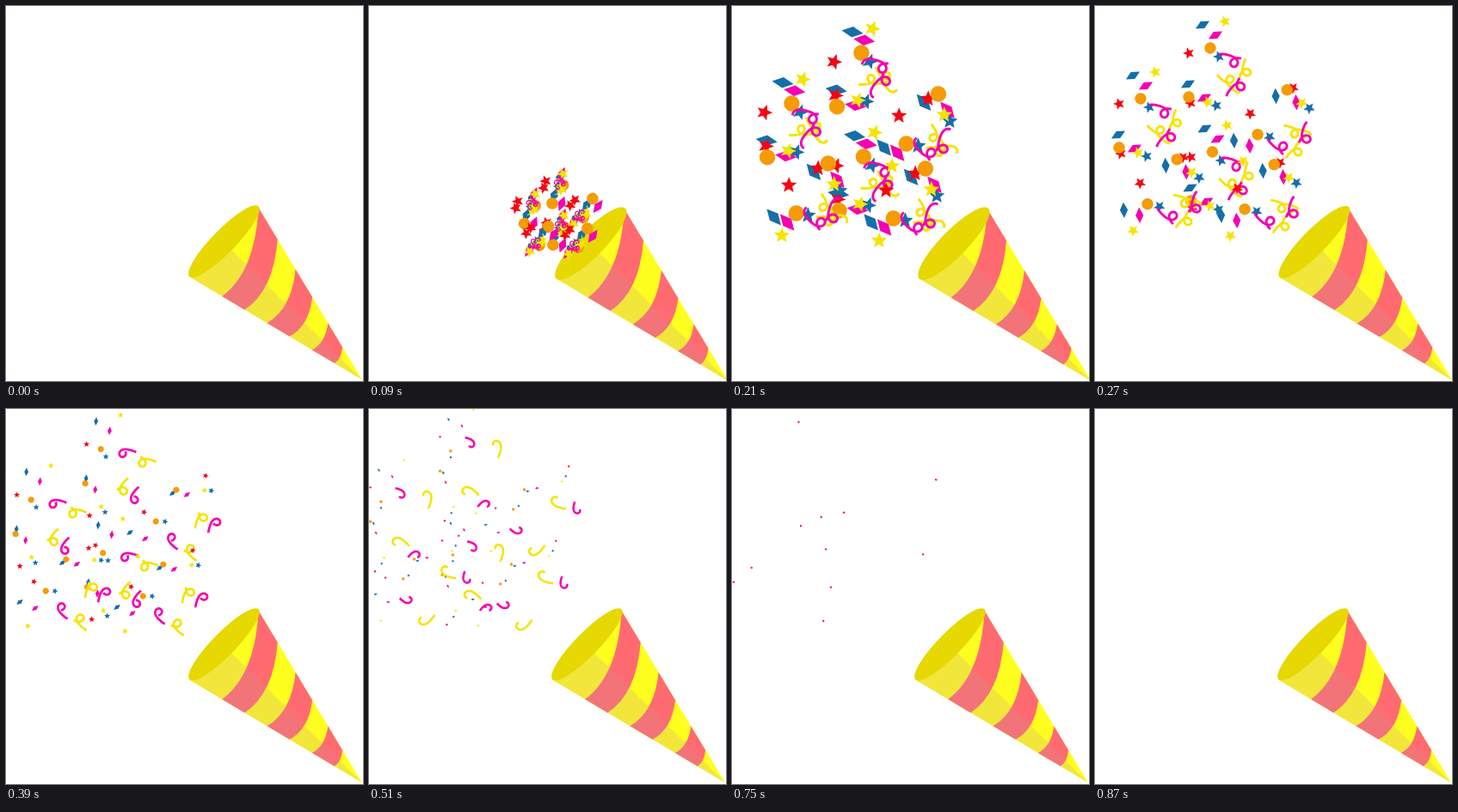
Write an HTML page with a canvas that moves like this. It is 415 px wide and 437 px high and loops after 1050 ms.

```html
<!DOCTYPE html>
<html lang="en">
<head>
<meta charset="utf-8">
<title>Party popper</title>
<style>
  html, body { margin: 0; width: 100%; height: 100%; overflow: hidden; background: #fff; }
  canvas { display: block; width: 100%; height: 100%; }
</style>
</head>
<body>
<canvas id="stage" width="415" height="437"></canvas>
<script>
const ctx = document.getElementById('stage').getContext('2d');
const LOOP = 1050, STEP = 30;
const BLUE = '#146fa8', PINK = '#f500b0', YELLOW = '#f5e400', RED = '#f50514', ORANGE = '#f59b05';

const rad = d => d * Math.PI / 180;
const clamp = (v, a, b) => Math.min(b, Math.max(a, v));
const mix = (a, b, f) => a + (b - a) * f;
const mix2 = (p, q, f) => [mix(p[0], q[0], f), mix(p[1], q[1], f)];

// One phase unit is 120 ms, counted from 150 ms. Everything slows by DRAG per unit.
const DRAG = .65;
const phase = t => (t - 150) / 120;
const slow = k => (1 - DRAG ** k) / (1 - DRAG ** 4);
const VIA = slow(1);

// Pieces fly from a start, past a bend, to an end
const pieces = [
  ['star', BLUE, [176, 75], [144, 59], [80, 58]],
  ['gem', BLUE, [160, 44], [125, 22], [85, 12]],
  ['gem', PINK, [171, 47], [140, 34], [100, 16]],
  ['star', RED, [129, 78], [109, 55], [75, 27]],
  ['star', YELLOW, [178, 38], [151, 18], [114, -3]],
  ['dot', ORANGE, [171, 66], [134, 49], [85, 52]],
  ['star', BLUE, [171, 103], [141, 116], [82, 121]],
  ['gem', BLUE, [141, 106], [108, 91], [83, 70]],
  ['gem', PINK, [165, 127], [127, 107], [80, 80]],
  ['star', RED, [132, 92], [111, 113], [82, 134]],
  ['star', YELLOW, [166, 106], [131, 112], [91, 114]],
  ['dot', ORANGE, [140, 129], [109, 106], [77, 62]]
];

// Curls are a window on an endless looping line: end and length in radians of curl
const pinkCurl = k => ({ end: -.5 - .45 * k + .6 * k * k, len: 9 - 1.7 * k, size: 8.5 - .9 * k, turn: 15 });
const yellowCurl = k => ({ end: .9, len: 11 - 2.2 * k, size: 7, turn: 17 + 90 * (k - 2) });
const ribbons = [
  [yellowCurl, YELLOW, 0, [184, 94], [139, 28]],
  [yellowCurl, YELLOW, -65, [175, 86], [97, 98]],
  [pinkCurl, PINK, 0, [180, 74], [98, 27]],
  [pinkCurl, PINK, -65, [180, 86], [119, 118]]
];

// The cluster is shown three times as it is and three times mirrored
const plain = [[0, 0], [-81, 59], [2.5, 121]];
const mirrored = [[75, 64], [-53, 145], [60, 151]];
const MIRROR = rad(57);
const MOUTH = [245, 290];

function poly(pts) {
  ctx.beginPath();
  pts.forEach(p => ctx.lineTo(...p));
  ctx.closePath();
  ctx.fill();
}

const starPts = Array.from({ length: 10 }, (_, i) => {
  const r = i % 2 ? 5.8 : 13, a = i * Math.PI / 5 - Math.PI / 2;
  return [r * Math.cos(a), r * Math.sin(a)];
});
const gemPts = [[-17, 0], [0, -8.5], [17, 0], [0, 8.5]];

function drawPiece([shape, color, from, via, to], k) {
  const size = 1.06 * .56 ** Math.max(k, -.5) - .05;
  if (size <= 0) return;
  const u = slow(k), bend = u * (1 - u) / (VIA * (1 - VIA));
  const chord = mix2(from, to, VIA), base = mix2(from, to, u);
  const angle = 239 * DRAG ** k - 185;
  ctx.save();
  ctx.translate(base[0] + (via[0] - chord[0]) * bend, base[1] + (via[1] - chord[1]) * bend);
  ctx.rotate(rad(shape === 'star' ? angle - 60 : angle));
  ctx.scale(size, size);
  ctx.fillStyle = color;
  if (shape === 'dot') {
    ctx.beginPath();
    ctx.arc(0, 0, 12.4, 0, 7);
    ctx.fill();
  } else poly(shape === 'star' ? starPts : gemPts);
  ctx.restore();
}

function drawRibbon([curl, color, spin, from, to], k) {
  const { end, len, size, turn } = curl(k);
  if (len <= 0) return;
  const N = 48, d = len / N, pts = [[0, 0]];
  for (let i = 0; i < N; i++) {
    const a = end - len + (i + .5) * d;
    const dir = a - .85 * Math.sin(a), [x, y] = pts[i];
    pts.push([x + Math.cos(dir) * d * size, y + Math.sin(dir) * d * size]);
  }
  const mid = o => pts.reduce((sum, p) => sum + p[o], 0) / pts.length;
  ctx.save();
  ctx.translate(...mix2(from, to, k / 4));
  ctx.rotate(rad(spin + turn));
  ctx.translate(-mid(0), -mid(1));
  ctx.strokeStyle = color;
  ctx.lineWidth = 3 - .15 * k;
  ctx.lineJoin = 'round';
  ctx.beginPath();
  pts.forEach(p => ctx.lineTo(...p));
  ctx.stroke();
  ctx.restore();
}

function drawConfetti(t) {
  const grow = clamp((t - 30) / 150, 0, 1), k = phase(t);
  if (!grow || t >= 870) return;
  const c = Math.cos(MIRROR), s = Math.sin(MIRROR);
  const copy = (...m) => {
    ctx.save();
    ctx.transform(...m);
    pieces.forEach(p => drawPiece(p, k));
    ribbons.forEach(r => drawRibbon(r, k));
    ctx.restore();
  };
  ctx.save();
  ctx.translate(...MOUTH);
  ctx.scale(grow, grow);
  ctx.translate(-MOUTH[0], -MOUTH[1]);
  plain.forEach(o => copy(1, 0, 0, 1, ...o));
  mirrored.forEach(o => copy(c, s, s, -c, ...o));
  ctx.restore();
}

const TIP = [414, 435.5], RIGHT = [293.5, 235], LEFT = [213, 315.5], BULGE = [276.4, 296.8];

// Bands run between curved seams, each a share of the way from tip to rim
const seam = i => {
  const r = 1 - .19 * i + .0056 * i * i, l = .81 - .13 * i;
  return [mix2(TIP, RIGHT, r), mix2(TIP, BULGE, (r + l) / 2), mix2(TIP, LEFT, l)];
};

function drawCone(t) {
  const kick = t < 150 ? t / 150 : clamp(2 - t / 150, 0, 1);
  ctx.save();
  ctx.translate(5.5 * kick, 2.3 * kick);
  ctx.fillStyle = '#ffff1f';
  poly([RIGHT, TIP, LEFT]);
  ctx.fillStyle = '#ff6b70';
  for (let i = 0; i < 6; i += 2) {
    const [a, b, c] = seam(i), [d, e, f] = seam(i + 1);
    ctx.beginPath();
    ctx.moveTo(...a);
    ctx.quadraticCurveTo(...b, ...c);
    ctx.lineTo(...f);
    ctx.quadraticCurveTo(...e, ...d);
    ctx.fill();
  }
  ctx.fillStyle = 'rgba(198,147,152,.23)';
  poly([mix2(LEFT, RIGHT, .5), TIP, LEFT]);
  ctx.fillStyle = '#e6d800';
  ctx.beginPath();
  ctx.ellipse(253.4 + 2 * kick, 274.2 + 2 * kick, 57.3, 13.6 + 3 * kick, rad(-45.6), 0, 7);
  ctx.fill();
  ctx.restore();
}

function frame(now) {
  const t = Math.floor((now % LOOP) / STEP) * STEP;
  ctx.fillStyle = '#fff';
  ctx.fillRect(0, 0, 415, 437);
  drawCone(t);
  drawConfetti(t);
}

let start = null;
function tick(now) {
  if (start === null) start = now;
  frame(now - start);
  requestAnimationFrame(tick);
}
frame(0);
requestAnimationFrame(tick);
</script>
</body>
</html>
```
